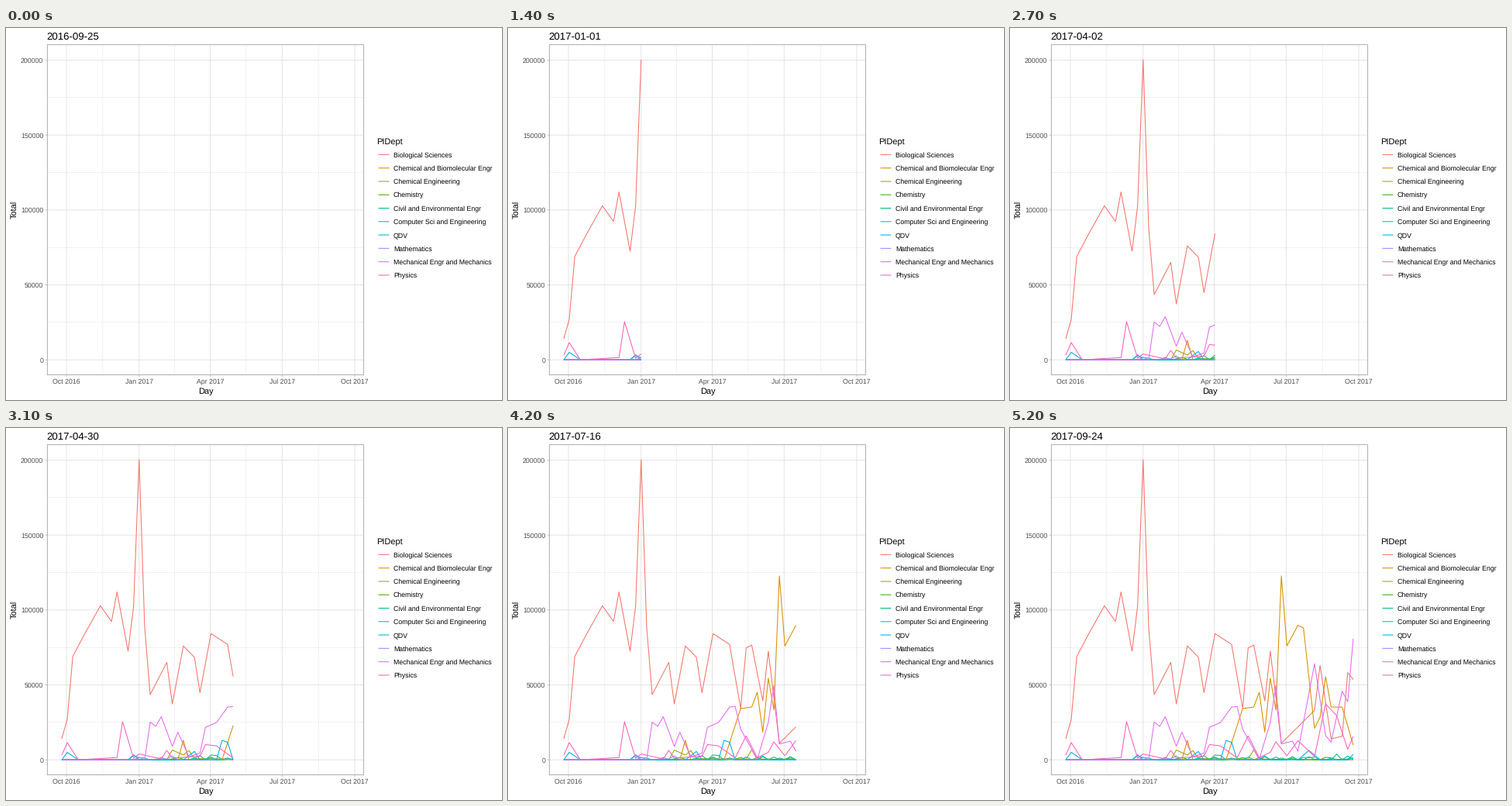
These frames come from a looping animation (640x480 px, 5300 ms). A matplotlib script:

```python
import matplotlib.pyplot as plt
import numpy as np
from matplotlib.animation import FuncAnimation

plt.rcParams["font.family"] = "Liberation Sans"
plt.rcParams["text.hinting"] = "none"

W, H, DPI = 640, 480, 100
PX = 72 / DPI
WEEKS = np.arange(53)
LEFT, RIGHT, TOP, BOTTOM = 53.4, 461.5, 21.5, 447.5
START = np.datetime64("2016-09-25")
MAJOR, MINOR, BORDER, GREY = 0.8, 0.4, "#b3b3b3", "#4d4d4d"


def day_x(day):
    return 71.9 + 1.0192 * (np.datetime64(day) - START).astype(int)


def total_y(total):
    return 428.15 - 0.0019335 * np.asarray(total)


def path(*points):
    """Weekly totals on straight lines between (week, hundreds) points."""
    weeks, hundreds = zip(*points)
    return 100 * np.interp(WEEKS, weeks, hundreds, right=0)


def bursts(seed, first, peak, end=len(WEEKS)):
    """Mostly tiny random totals from the first week on, now and then high."""
    noise = np.random.default_rng(seed).random(len(WEEKS)) ** 4
    return np.where(WEEKS < first, 0, peak * noise)[:end]


DEPTS = [
    ("Biological Sciences", "#F8766D", path(
        (0, 140), (1, 270), (2, 690), (4, 830), (7, 1028), (9, 923),
        (10, 1120), (12, 725), (13, 1025), (14, 2003), (15, 885), (16, 435),
        (19, 650), (20, 373), (22, 760), (24, 684), (25, 448), (27, 842),
        (30, 770), (32, 343), (33, 747), (34, 766), (36, 393), (37, 725),
        (39, 110), (45, 330), (46, 630), (48, 140), (50, 157), (51, 582),
        (52, 536))),
    ("Chemical and Biomolecular Engr", "#D89000", path(
        (21, 0), (22, 130), (23, 0), (29, 0), (32, 342), (34, 352), (35, 451),
        (36, 185), (37, 544), (38, 333), (39, 1227), (40, 760), (42, 898),
        (43, 880), (45, 210), (46, 285), (47, 555), (48, 352), (50, 352),
        (52, 98))),
    ("Chemical Engineering", "#A3A500", path(
        (19, 0), (20, 65), (22, 32), (23, 62), (24, 8), (33, 5), (34, 67),
        (35, 5), (52, 0))),
    ("Chemistry", "#39B600", bursts(4, 18, 2000)),
    ("Civil and Environmental Engr", "#00BF7D", bursts(5, 23, 5000)),
    ("Computer Sci and Engineering", "#00BFC4", bursts(6, 12, 3000)),
    ("QDV", "#00B0F6", path(
        (0, 0), (1, 50), (3, 0), (12, 0), (13, 34), (14, 0), (22, 0),
        (24, 56), (25, 0), (28, 0), (29, 130), (30, 117), (31, 0), (42, 0),
        (44, 63), (46, 0), (51, 0), (52, 36))),
    ("Mathematics", "#9590FF", bursts(8, 11, 3800, end=36)),
    ("Mechanical Engr and Mechanics", "#E76BF3", path(
        (15, 0), (16, 252), (17, 223), (18, 288), (20, 90), (21, 184),
        (23, 20), (25, 45), (26, 217), (28, 249), (30, 352), (31, 356),
        (32, 205), (35, 3), (37, 250), (38, 496), (39, 106), (41, 125),
        (42, 57), (45, 641), (47, 162), (48, 118), (50, 458), (51, 388),
        (52, 808))),
    ("Physics", "#FF62BC", path(
        (0, 30), (1, 115), (3, 0), (10, 15), (11, 255), (13, 10), (14, 39),
        (18, 6), (19, 63), (20, 12), (25, 24), (26, 102), (28, 93), (31, 12),
        (33, 160), (35, 15), (37, 50), (38, 120), (40, 27), (42, 128),
        (45, 22), (47, 373), (49, 295), (51, 70), (52, 157))),
]

fig = plt.figure(figsize=(W / DPI, H / DPI), dpi=DPI, facecolor="white")
ax = fig.add_axes([0, 0, 1, 1])
ax.set(xlim=(0, W), ylim=(H, 0))
ax.axis("off")


def line(xs, ys, color, width=1.07, z=1):
    return ax.plot(xs, ys, color=color, lw=width * PX, snap=False, zorder=z,
                   solid_capstyle="butt")[0]


def label(x, y, text, size, color="black", **kw):
    return ax.text(x, y, text, fontsize=size * PX, color=color,
                   va="baseline", **kw)


def grid_x(x, width):
    line([x, x], [TOP, BOTTOM], "#dedede", width)


def grid_y(y, width):
    line([LEFT, RIGHT], [y, y], "#dedede", width)


quarters = ["2016-10", "2017-01", "2017-04", "2017-07", "2017-10"]
months = {"01": "Jan", "04": "Apr", "07": "Jul", "10": "Oct"}
xs = [day_x(quarter + "-01") for quarter in quarters]
for a, b in zip(xs, xs[1:]):
    grid_x((a + b) / 2, MINOR)
for total in range(25000, 200000, 50000):
    grid_y(total_y(total), MINOR)
for x, quarter in zip(xs, quarters):
    year, month = quarter.split("-")
    grid_x(x, MAJOR)
    line([x, x], [BOTTOM, BOTTOM + 2.7], BORDER, MAJOR)
    label(x, 459, f"{months[month]} {year}", 8.8, GREY, ha="center")
for total in range(0, 200001, 50000):
    y = total_y(total)
    grid_y(y, MAJOR)
    line([LEFT - 2.7, LEFT], [y, y], BORDER, MAJOR)
    label(48.3, y + 3.4, str(total), 8.8, GREY, ha="right")
line([LEFT, RIGHT, RIGHT, LEFT, LEFT], [TOP, TOP, BOTTOM, BOTTOM, TOP],
     BORDER, z=4)

label((LEFT + RIGHT) / 2, 472, "Day", 11, ha="center")
label(14.6, 234.5, "Total", 11, ha="center", rotation=90,
      rotation_mode="anchor")
label(478, 150, "PIDept", 11)
title = label(52.6, 15, "", 13.2)

curves = []
for row, (name, color, _) in enumerate(DEPTS):
    y = 163.4 + 17.28 * row
    line([480.5, 494.4], [y, y], color)
    label(500, y + 3.3, name, 8.8)
    curves.append(line([], [], color, z=3))

week_x = day_x(START) + 7 * 1.0192 * WEEKS


def update(week):
    shown = week + 1 if week else 0  # a single point draws no line
    for curve, (_, _, totals) in zip(curves, DEPTS):
        part = totals[:shown]
        curve.set_data(week_x[:len(part)], total_y(part))
    title.set_text(str(START + 7 * week))
    return curves + [title]


anim = FuncAnimation(fig, update, frames=len(WEEKS), interval=100, repeat=True)
plt.show()
```
